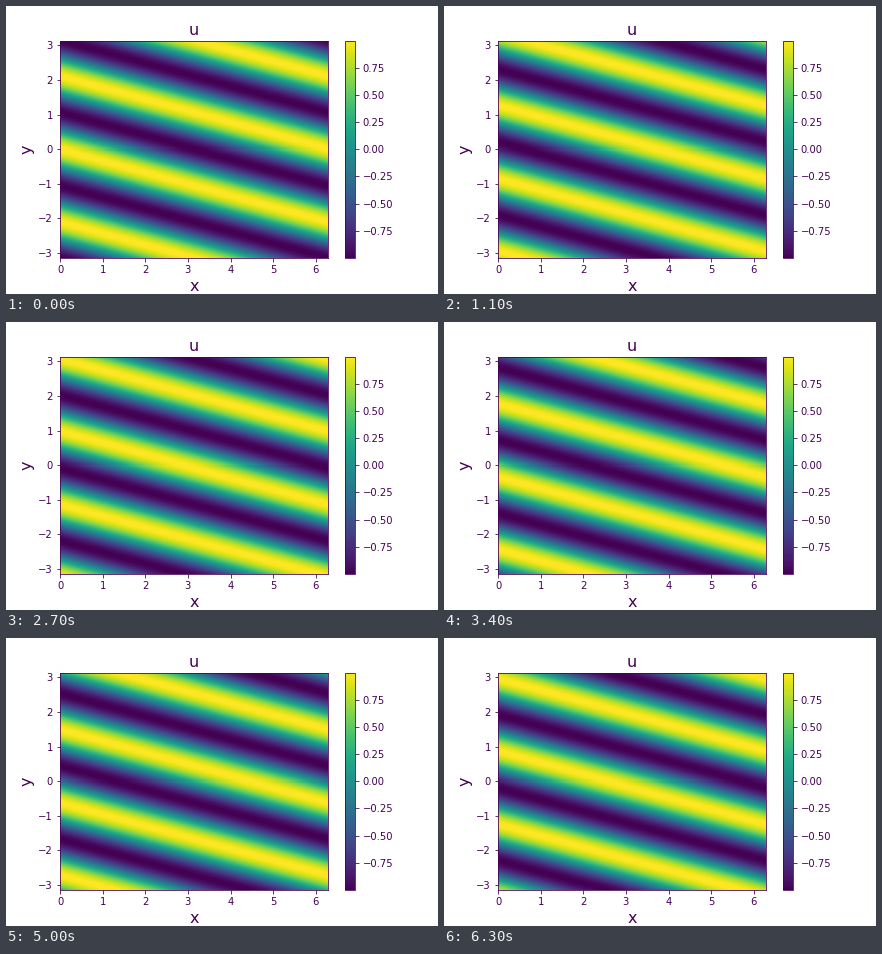
A matplotlib script that plays this animation: 432 px wide and 288 px high, repeating every 6.4 s.

```python
import numpy as np
import matplotlib.pyplot as plt
from matplotlib.animation import FuncAnimation

FRAMES, INTERVAL = 64, 100
PHASE_STEP = 0.34          # radians the wave advances per frame
INK = "#440154"
NX, NY = 268, 217

plt.rcParams.update({
    "font.family": "DejaVu Sans",
    "font.size": 10,
    "text.color": INK,
    "axes.edgecolor": INK,
    "axes.labelcolor": INK,
    "xtick.color": INK,
    "ytick.color": INK,
})

x = (np.arange(NX) + 0.5) * 2 * np.pi / NX
y = (np.arange(NY) + 0.5) * 2 * np.pi / NY - np.pi
X, Y = np.meshgrid(x, y)


def wave(frame):
    return np.cos(X + 3 * Y - PHASE_STEP * frame)


fig, ax = plt.subplots(figsize=(6, 4), dpi=72)
fig.subplots_adjust(left=0.125, right=0.9, bottom=0.125, top=0.88)

image = ax.imshow(wave(0), origin="lower", aspect="auto", cmap="viridis",
                  extent=(0, 2 * np.pi, -np.pi, np.pi),
                  vmin=-0.9995, vmax=0.9995, interpolation="nearest")
ax.set_xticks(range(7))
ax.set_yticks(range(-3, 4))
ax.set_title("u", fontsize=16)
ax.set_xlabel("x", fontsize=16)
ax.set_ylabel("y", fontsize=16)
fig.colorbar(image, ax=ax, ticks=np.arange(-0.75, 0.8, 0.25))


def update(frame):
    image.set_data(wave(frame))
    return [image]


anim = FuncAnimation(fig, update, frames=FRAMES, interval=INTERVAL,
                     repeat=True, repeat_delay=0)
plt.show()
```
